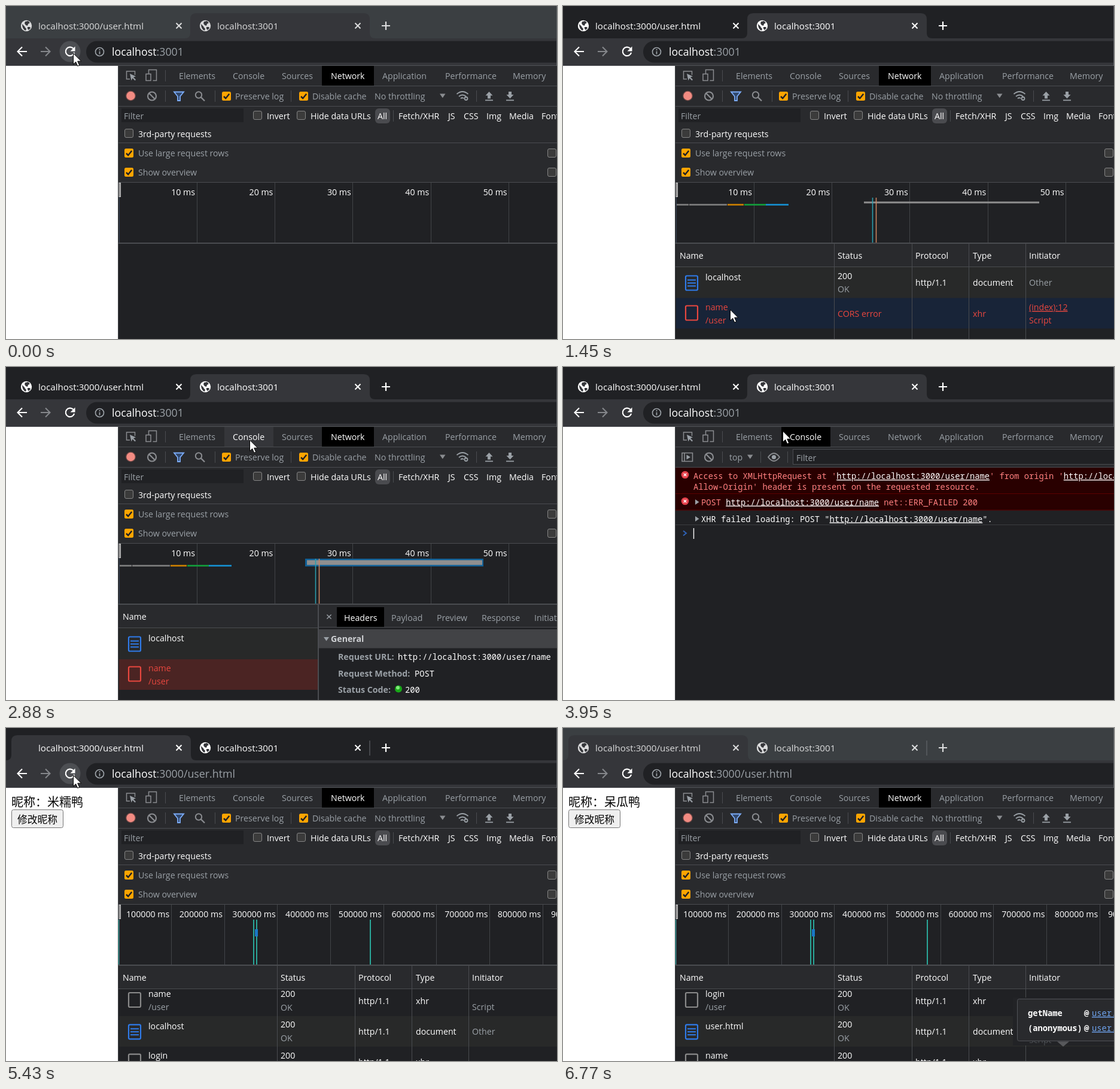
An HTML page for the animation above (6810 ms loop, 921x556 px).

```html
<!DOCTYPE html>
<html lang="en">
<head>
<meta charset="utf-8">
<title>Request log</title>
<style>
html, body { margin: 0; width: 100%; height: 100%; overflow: hidden; background: #202124; }
svg { display: block; width: 100vw; height: 100vh; }
text { font: 14.2px "Open Sans", "Noto Sans", sans-serif; fill: #9aa0a6; white-space: pre; }
.w { fill: #fff; }
.r { fill: #e9473f; }
.m { font: 13.75px "Noto Sans Mono", "DejaVu Sans Mono", monospace; }
.b { font-weight: 700; }
.e { fill: #ff8080; }
.u { text-decoration: underline; }
.tab { font-size: 15.2px; fill: #fff; }
.url { font-size: 17.8px; }
.cjk { font-family: "Noto Sans CJK SC", "Noto Sans CJK", sans-serif; fill: #000; }
</style>
</head>
<body>
<svg id="stage" viewBox="0 0 921 556"></svg>
<script>
const LOOP = 6810;
const LINE = '#4a4c50', GREY = '#9aa0a6', DIM = '#8a8c90', BASE = '#202124', PANEL = '#292a2d';

// Drawing helpers; text is placed by its left edge and the middle of its capitals.
const text = (x, y, s, cls = '', extra = '') => `<text x="${x}" y="${y + 5}" class="${cls}" ${extra}>${s}</text>`;
const rect = (x, y, w, h, fill, extra = '') => `<rect x="${x}" y="${y}" width="${w}" height="${h}" fill="${fill}" ${extra}/>`;
const path = (d, stroke, w = 1, fill = 'none') => `<path d="${d}" stroke="${stroke}" stroke-width="${w}" fill="${fill}"/>`;
const circle = (x, y, r, fill, extra = '') => `<circle cx="${x}" cy="${y}" r="${r}" fill="${fill}" ${extra}/>`;
const vline = (x, y1, y2, c = LINE, w = 1) => path(`M${x} ${y1}V${y2}`, c, w);
const hline = (y, x1 = 188, x2 = 921, c = LINE, w = 1) => path(`M${x1} ${y}H${x2}`, c, w);
const group = (id, ...parts) => `<g id="${id}">${parts.join('')}</g>`;
const each = (list, fn) => list.map(fn).join('');

const tabShape = x => `M${x - 9} 54q9 0 9-9V22q0-10 10-10H${x + 290}q10 0 10 10V45q0 9 9 9z`;
const closeMark = (x, y, c, r = 4.5, w = 2) => path(`M${x - r} ${y - r}l${2 * r} ${2 * r}m0 ${-2 * r}l${-2 * r} ${2 * r}`, c, w);
const globe = (id, x) => group(id, circle(x, 33, 9.2, '#fff'),
  path(`M${x - 7} 30l4 4 1 2 2 2-1 3q-6-2-6-11zM${x - 2} 26l5-1 3 3-3 2-1 3-3-1-2-3zM${x + 2} 35l4 0 1 2-3 3-2-2z`, 'none', 0, '#35363a'));

function check(x, y, on) {
  return on
    ? rect(x, y, 15, 15, '#ffa500', 'rx="2.5"') + path(`M${x + 3} ${y + 8}l3.2 3.2 6-7.4`, '#202124', 2.5)
    : rect(x + .5, y + .5, 14, 14, '#3b3b3b', 'rx="2.5" stroke="#858585"');
}
const clearIcon = circle(244, 150.5, 7, 'none', `stroke="${DIM}" stroke-width="2.2"`) + path('M239 145.5l10 10', DIM, 2.2);

function browser() {
  return rect(0, 0, 921, 100, BASE) + rect(0, 0, 921, 54, '#3b3f42', 'id="idle"') +
    `<path id="tabHover" d="${tabShape(9)}" fill="#2b2c30"/>` +
    `<path id="tab" fill="#35363a"/>` + rect(0, 54, 921, 46, '#35363a') +
    group('tabText',
      globe('icon1', 34), globe('icon2', 333),
      text(54, 33.5, 'localhost:3000/user.html', 'tab'), text(353, 33.5, 'localhost:3001', 'tab'),
      closeMark(289, 33, '#fff'), closeMark(588, 33, '#fff'),
      path('M628 33h14m-7-7v14', '#fff', 2.2)) +
    group('tabEdge', vline(608, 21, 46, '#6a6e73')) +
    circle(107, 76, 17.5, '#4d4f53', 'id="reloadHover"') +
    path('M35 76H20m7-7.5L19.5 76l7.5 7.5', '#fff', 2.1) +
    path('M58 76h15m-7-7.5l7.5 7.5-7.5 7.5', '#85878b', 2.1) +
    path('M112.300 70.800a7.300 7.300 0 1 0 1.800 7', '#fff', 2.2) + path('M115.500 67.500v8h-8z', 'none', 0, '#fff') +
    rect(134, 58.5, 820, 36, BASE, 'rx="18"') +
    circle(156.5, 76.5, 7, 'none', `stroke="${GREY}" stroke-width="1.7"`) +
    path('M156.5 72v2m0 1.5v5', GREY, 1.8) +
    `<text x="177" y="82.5" class="url"><tspan fill="#fff">localhost</tspan><tspan id="port"></tspan></text>` +
    hline(99.5, 0, 921, '#505256') + vline(920.5, 0, 100, '#5c5f63');
}

function page() {
  return rect(0, 100, 187, 456, '#fff') + group('profile',
    `<text id="nick" x="9" y="131" class="cjk" style="font-size:20px"></text>`,
    rect(9.5, 136.5, 86, 30, '#efefef', 'rx="3" stroke="#767676"'),
    `<text x="19" y="158.5" class="cjk" style="font-size:16.8px">修改昵称</text>`);
}

const panels = [['Elements', 289], ['Console', 379], ['Sources', 461], ['Network', 543],
  ['Application', 629], ['Performance', 734], ['Memory', 847]];

function devtools() {
  return rect(187, 100, 734, 456, BASE) + rect(187, 100, 734, 68, PANEL) +
    rect(0, 100, 0, 33, '#000', 'id="panelBg"') + rect(365, 100, 82, 33, '#35363a', 'id="panelHover"') +
    path('M207 122h-5.5v-13h14v6', DIM, 1.5) + path('M207 113l10 4.5-4 1.5 4 4-1.5 1.5-4-4-2 4z', 'none', 0, GREY) +
    path('M238.5 113v-6.5h13v18h-6M234 113.5h8v11h-8z', DIM, 1.5) + vline(266.5, 107, 126) +
    each(panels, ([s, x]) => text(x, 117, s, '', `id="p${s}"`)) +
    hline(133.5) + hline(167.5);
}

function networkBar() {
  return rect(188, 168, 733, 127, PANEL) +
    circle(208.5, 150, 8.5, '#6b4644') + circle(208.5, 150, 7.2, '#f28b82') + clearIcon +
    vline(266.5, 141, 160) + path('M281 143.5h16l-6 7.5v7h-4v-7z', '#7cacf8', 1.8, '#30476b') +
    circle(322, 148.5, 5.2, 'none', `stroke="${DIM}" stroke-width="2"`) + path('M326 152.5l6 6', DIM, 2.3) +
    vline(349.5, 141, 160) + check(361, 143, 1) + text(383, 151, 'Preserve log') +
    vline(476.5, 141, 160) + check(490, 143, 1) + text(512, 151, 'Disable cache') + text(616, 151, 'No throttling') +
    path('M725 146.5h9.5l-4.7 7z', 'none', 0, DIM) +
    path('M753.5 147q9.5-8 19 0M757 151q6-5 12 0M760 154.5q3-2.5 5 0', GREY, 1.8) +
    circle(769, 154.5, 2.5, 'none', `stroke="${GREY}" stroke-width="1.8"`) + vline(786.5, 141, 160) +
    path('M807.5 143l6 6.5h-3.5v5h-5v-5h-3.5zM801 156.5h13v1.8h-13zM842.5 154.5l6-6.5h-3.5v-5h-5v5h-3.5zM836 156.5h13v1.8h-13z', 'none', 0, GREY) +
    rect(193, 171, 204, 23, BASE) + text(197, 184, 'Filter') +
    check(413, 175) + text(436, 184, 'Invert', 'w') + check(486, 175) + text(509, 184, 'Hide data URLs', 'w') +
    rect(617, 171, 25, 25, '#4a4b4f', 'rx="6"') + vline(647.5, 174, 193) +
    each([['All', 621], ['Fetch/XHR', 656], ['JS', 739], ['CSS', 765], ['Img', 803], ['Media', 841], ['Font', 895]],
      ([s, x]) => text(x, 184, s, 'w')) +
    check(198, 205) + text(221, 214, '3rd-party requests', 'w') + hline(228.5) +
    each([[246, 'Use large request rows'], [278, 'Show overview']],
      ([y, s]) => check(198, y - 8, 1) + text(221, y, s) + check(905, y - 8)) +
    hline(294.5);
}

function ruler(id, first, step, count, unit) {
  let s = '';
  for (let i = 0; i < count; i++) {
    const x = first + i * step;
    s += vline(Math.floor(x) + .5, 295, 395, '#424448') +
      text(x - 3, 311, `${unit * (i + 1)} ms`, 'w', 'text-anchor="end"');
  }
  return group(id, s);
}

function overview() {
  const mark = x => vline(x, 320, 395, '#2aa89a', 2);
  return ruler('rulerA', 319, 130.4, 5, 10) +
    group('rulerB', ruler('ticks', 276.3, 88.7, 8, 100000), text(911, 311, '900000 ms', 'w'),
      each([189, 414, 419, 609], mark), rect(416, 336, 5, 12, '#1a78c8')) +
    group('bars',
      rect(500, 320, 298, 13, '#0f5f96', 'id="barFrame"'), rect(503, 326.5, 293, 3, '#8f8f8f', 'id="bar"'),
      each([[190, 20, '#808080'], [211, 63, '#808080'], [275, 27, '#cf8100'], [303, 36, '#12a13c'], [339, 38, '#1593d6']],
        ([x, w, c]) => rect(x, 330.5, w, 2.6, c)),
      vline(517.5, 320, 395, '#2a9fae', 1.6), vline(523.5, 320, 395, '#c9835f', 1.6)) +
    vline(189.5, 319, 395, '#3a4657') + rect(188.5, 295, 3.5, 24, '#c8c8c8') + rect(189.5, 296, 1.3, 22, '#777') +
    hline(396, 188, 921, LINE, 2);
}

const icon = (y, kind, c) => rect(205, y - 12, 20, 24, 'none', `rx="2" stroke="${c}" stroke-width="2.2"`) +
  (kind === 'document' ? path(`M208 ${y - 5}h14m-14 5h14m-14 5h14`, c, 1.9) : '');

function nameCell(top, name, kind, failed) {
  const doc = kind === 'document';
  return icon(top + (doc ? 26.5 : 24.5), kind, failed ? '#e9473f' : doc ? '#2f7bea' : '#8a8a8a') +
    text(238, top + (doc ? 17 : 14.5), name, failed ? 'r' : 'w') +
    (doc ? '' : text(238, top + 36.5, '/user', failed ? 'r' : ''));
}
const cells = (top, kind) => text(459, top + 14.5, '200', 'w') + text(459, top + 37, 'OK') +
  text(589, top + 26, 'http/1.1', 'w') + text(685, top + 26, kind, 'w') +
  (kind === 'document' ? text(779, top + 26, 'Other') : text(779, top + 36.5, 'Script'));

const list = (id, names) => group(id, each(names, (n, i) => {
  const top = 429.5 + i * 51.3, kind = i === 1 ? 'document' : 'xhr';
  return nameCell(top, n, kind) + cells(top, kind);
}));

function table() {
  return group('stripeA', rect(189, 436, 732, 52, '#282929')) +
    group('stripeB', rect(189, 481, 732, 51, '#282929')) +
    rect(189, 0, 732, 51, '#182438', 'id="rowHover"') +
    group('rowPicked', rect(189, 488, 333, 51, '#4b2423')) +
    group('namesA', nameCell(436, 'localhost', 'document'), nameCell(488, 'name', 'xhr', true)) +
    group('cellsA', cells(436, 'document'), text(459, 514, 'CORS error', 'r'), text(685, 514, 'xhr', 'r'),
      text(779, 503, '(index):12', 'r u'), text(779, 525, 'Script', 'r')) +
    list('listB', ['name', 'localhost', 'login']) + list('listC', ['login', 'user.html', 'name']) +
    group('head', rect(189, 397, 732, 38, PANEL), hline(435.5), text(195, 417, 'Name', 'w'),
      group('columns', each([['Status', 459], ['Protocol', 589], ['Type', 685], ['Initiator', 779]],
        ([s, x]) => text(x, 417, s, 'w')), each([453.5, 583.5, 678.5, 773.5], x => vline(x, 397, 556))));
}

function details() {
  const row = (y, label, x, value) => text(555, y, label, 'b') + text(x, y, value, 'm w');
  return group('details', rect(522, 397, 399, 159, BASE), rect(522, 397, 399, 38, PANEL), vline(522, 397, 556, LINE, 2),
    closeMark(540, 417, GREY, 3.6, 1.4), rect(553, 401, 79, 34, '#000'), hline(434.5, 523),
    each([['Headers', 565], ['Payload', 644], ['Preview', 720], ['Response', 795], ['Initiator', 883]],
      ([s, x], i) => text(x, 419, s, i ? '' : 'w')),
    rect(523, 438, 398, 31.5, '#424346'), path('M531 451h9l-4.5 6.5z', 'none', 0, GREY),
    text(543, 454, 'General', 'b', 'style="fill:#cfd1d4"'),
    row(484, 'Request URL:', 655, 'http://localhost:3000/user/name'),
    row(512, 'Request Method:', 683, 'POST'), row(539, 'Status Code:', 667, '200'),
    circle(656, 537.5, 6, '#18a818'), circle(655, 535.5, 3, '#7fe87a'));
}

function consolePanel() {
  const link = s => `<tspan class="u" fill="#fff">${s}</tspan>`;
  const url = link('http://localhost:3000/user/name');
  const fail = y => circle(204, y, 6.3, '#e5414b') + closeMark(204, y, '#fff', 2.3, 1.5);
  const more = y => path(`M221 ${y - 4.5}l6.5 4.5-6.5 4.5z`, 'none', 0, GREY);
  return group('console', path('M199 143.5h17.5v14H199zM203 143.5v14', DIM, 1.6), path('M206.5 146.5l6.5 4-6.5 4z', 'none', 0, GREY),
    clearIcon, vline(266.5, 141, 160), text(278, 151, 'top'), path('M308 146.5h9.5l-4.7 7z', 'none', 0, DIM),
    vline(330.5, 141, 160), path('M343 150.5q9.5-13 19 0q-9.5 13-19 0z', DIM, 1.8), circle(352.5, 150.5, 3.6, GREY),
    vline(375.5, 141, 160), rect(384.5, 137.5, 560, 25, BASE, `stroke="${LINE}"`), text(390, 152, 'Filter'),
    rect(188, 168, 733, 71, '#290000'), hline(211.5, 188, 921, '#5c0000'), hline(239, 188, 921, '#5c0000'),
    hline(263.5, 188, 921, '#3c3e41'), fail(180), fail(224), more(225.5), more(253.5),
    text(218, 182, `Access to XMLHttpRequest at '${url}' from origin '${link('http://localhost:3001')}'`, 'm e'),
    text(218, 200, "Allow-Origin' header is present on the requested resource.", 'm e'),
    text(231, 225.5, `POST ${url} net::ERR_FAILED 200`, 'm e'),
    text(231, 253.5, `XHR failed loading: POST "${url}".`, 'm w'),
    path('M201 273.5l5 4-5 4', '#2f62b5', 2), group('caret', vline(218.5, 269, 287, '#fff', 1.4)));
}

function tooltip() {
  const line = (y, s) => text(777, y, s, 'm b w') + text(871, y, '@', 'm b w') +
    text(884, y, 'user.html', 'm u', 'style="fill:#6ea3ee"');
  return group('tip', rect(752, 450, 169, 80, '#222326'), text(779, 521, 'Script', '', 'opacity=".35"'),
    path('M826 523.5h20l-10 8.5z', 'none', 0, '#58595c'),
    rect(759.5, 452.5, 180, 70, PANEL, 'rx="3" stroke="#505257"'), line(476, 'getName'), line(501, '(anonymous)'));
}

document.getElementById('stage').innerHTML = browser() + devtools() +
  group('network', networkBar(), overview(), group('table', table()), details(), tooltip()) +
  consolePanel() + page() + vline(187.5, 100, 556) +
  group('cursor', path('M.5 0V18.300l4.200-4 3 7 3-1.300-3-6.800h6z', '#000', 1, '#fff'));

const el = {};
document.querySelectorAll('[id]').forEach(n => el[n.id] = n);
const show = (id, on) => { el[id].style.display = on ? '' : 'none'; };
const between = (t, a, b) => t >= a && t < b;

// time, x, y of the pointer
const route = [[0, 112, 79], [640, 112, 79], [1150, 119, 87], [1450, 279, 507], [1980, 279, 507], [2700, 450, 136],
  [2880, 407, 122], [3620, 407, 122], [3740, 442, 117], [3950, 367, 107], [4280, 226, 46], [4420, 226, 46],
  [5040, 110, 79], [5250, 110, 79], [5280, 112, 79], [5700, 112, 79], [6410, 806, 562], [6620, 815, 610]];

function pointer(t) {
  const i = route.findIndex(k => k[0] > t);
  if (i < 1) return i ? route[route.length - 1].slice(1) : route[0].slice(1);
  const [t0, x0, y0] = route[i - 1], [t1, x1, y1] = route[i];
  const u = (t - t0) / (t1 - t0), k = u * u * (3 - 2 * u);
  return [x0 + (x1 - x0) * k, y0 + (y1 - y0) * k];
}

// Share of the last 150 ms spent over the reload button
function reloadHover(t) {
  let n = 0;
  for (let i = 0; i < 10; i++) {
    const [x, y] = pointer(t - i * 15);
    if (Math.hypot(x - 107, y - 76) < 18) n++;
  }
  return n / 10;
}

function draw(t) {
  const [x, y] = pointer(t);
  const idle = t < 340 || t >= 6770, first = t >= 4420;
  const inConsole = between(t, 3440, 4420), onConsole = between(t, 3410, 4420);
  const loaded = t >= 550, picked = between(t, 1700, 4420), fresh = t >= 5460;

  show('idle', idle);
  el.tabText.setAttribute('opacity', idle ? .82 : 1);
  el.tab.setAttribute('d', tabShape(first ? 9 : 308));
  show('tabEdge', first);
  show('tabHover', !first && y < 54 && x < 308);
  show('icon1', !between(t, 5430, 5490));
  show('icon2', !between(t, 490, 580));
  el.reloadHover.setAttribute('opacity', reloadHover(t));
  el.port.textContent = first ? ':3000/user.html' : ':3001';
  show('profile', first);
  el.nick.textContent = '昵称：' + (fresh ? '呆瓜鸭' : '米糯鸭');

  const overConsole = between(y, 100, 133) && between(x, 365, 447);
  const active = onConsole ? 'Console' : 'Network';
  el.panelBg.setAttribute('x', onConsole ? 365 : 528);
  el.panelBg.setAttribute('width', onConsole ? 82 : 87);
  show('panelHover', overConsole && !onConsole);
  for (const [s] of panels) {
    el['p' + s].style.fill = s === active || (s === 'Console' && overConsole) ? '#fff' : GREY;
  }

  show('network', !inConsole);
  show('console', inConsole);
  show('caret', between(t, 3440, 3980));
  show('rulerA', !first);
  show('rulerB', first);
  show('bars', loaded && !first);
  show('barFrame', picked);
  el.bar.setAttribute('y', picked ? 322.5 : 326.5);
  el.bar.setAttribute('height', picked ? 8 : 3);
  show('table', loaded);
  for (const id of ['stripeA', 'namesA']) show(id, !first);
  show('cellsA', !first && !picked);
  show('columns', !picked);
  show('rowPicked', picked);
  show('details', picked);
  show('stripeB', first);
  show('listB', first && !fresh);
  show('listC', fresh);

  const base = first ? 430 : 436, row = Math.floor((y - base) / 51.5);
  show('rowHover', y > 436 && x > 189 && row < (first ? 3 : 2));
  el.rowHover.setAttribute('y', base + row * 51.5);
  el.tip.setAttribute('opacity', Math.min(1, Math.max(0, (t - 6410) / 180)));
  el.cursor.setAttribute('transform', `translate(${x.toFixed(1)} ${y.toFixed(1)})`);
}

function tick() {
  draw(performance.now() % LOOP);
  requestAnimationFrame(tick);
}
tick();
</script>
</body>
</html>
```
